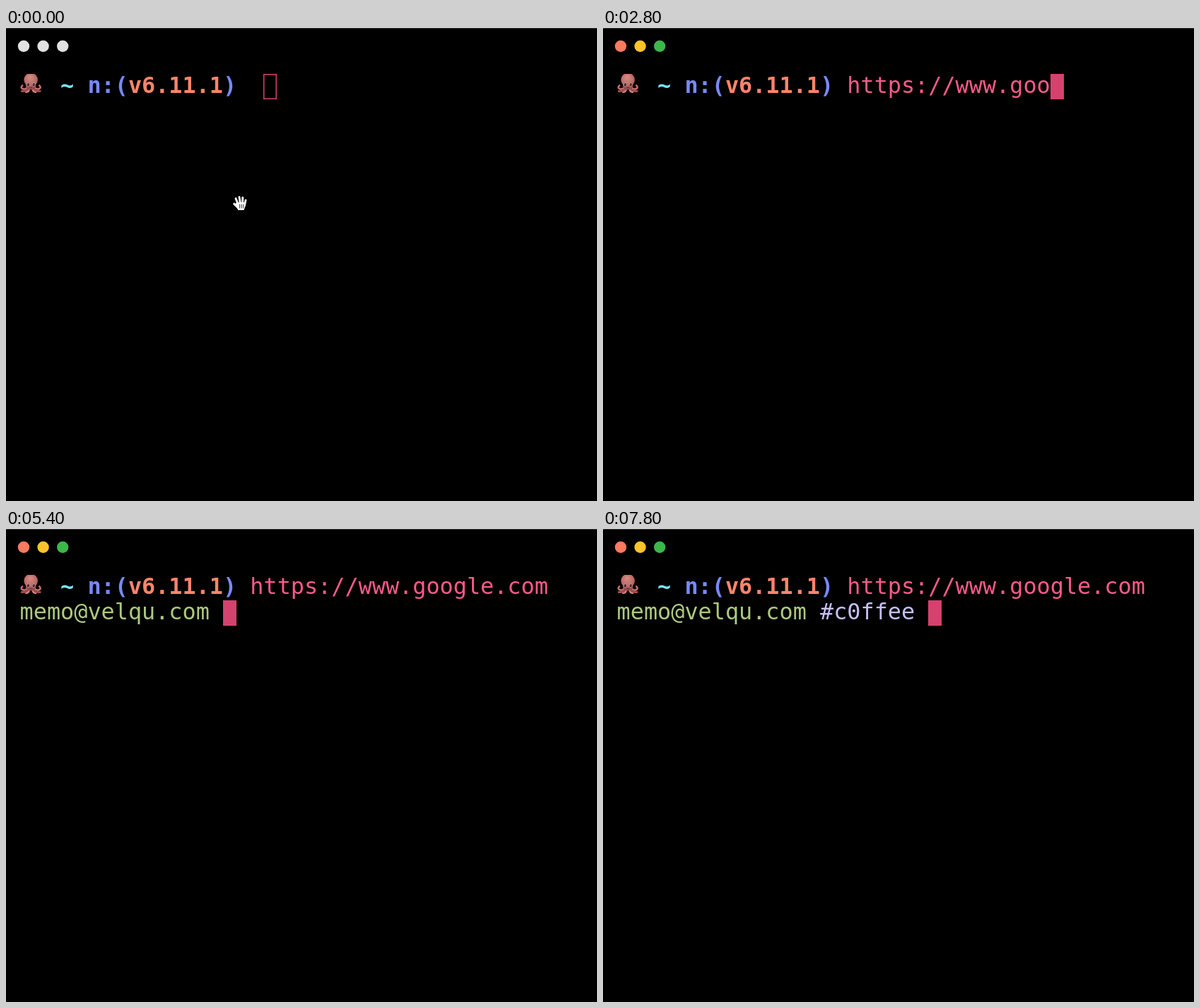
An HTML page with a canvas for the animation above (8000 ms loop, 836 by 670 pixels).

```html
<!DOCTYPE html>
<html lang="en">
<head>
<meta charset="utf-8">
<title>Terminal</title>
<style>
html, body { margin: 0; width: 100%; height: 100%; overflow: hidden; background: #000; }
canvas { display: block; }
</style>
</head>
<body>
<canvas id="stage" width="836" height="670"></canvas>
<script>
const ctx = document.getElementById('stage').getContext('2d');
const LOOP = 8000, STEP = 200, FOCUS = 600, HIDE_HAND = 1000;
const LEFT = 19.6, TOP = 65, COL = 19.16, ROW = 36;
const FONT = '31.83px "DejaVu Sans Mono", monospace';
const URL_TEXT = 'https://www.google.com ';
const REST = 'memo@velqu.com #c0ffee ';
const PINK = '#d5426e';

// Typing pace: time, characters typed
const PACE = [[800, 0], [1600, 6], [2800, 15], [3600, 23], [4600, 31],
  [5400, 38], [6000, 38], [6400, 40], [7400, 46]];

function typedAt(t) {
  if (t <= PACE[0][0]) return 0;
  for (let i = 1; i < PACE.length; i++) {
    const [t0, n0] = PACE[i - 1], [t1, n1] = PACE[i];
    if (t <= t1) return Math.floor(n0 + (n1 - n0) * (t - t0) / (t1 - t0) + 1e-6);
  }
  return URL_TEXT.length + REST.length;
}

const cellX = col => LEFT + col * COL;

function write(text, col, row, color, bold) {
  ctx.font = (bold ? 'bold ' : '') + FONT;
  ctx.fillStyle = color;
  [...text].forEach((ch, i) => ctx.fillText(ch, cellX(col + i), 92 + row * ROW));
}

function ellipse(x, y, rx, ry, color) {
  ctx.fillStyle = color;
  ctx.beginPath();
  ctx.ellipse(x, y, rx, ry, 0, 0, Math.PI * 2);
  ctx.fill();
}

function stroke(path, color, width) {
  ctx.strokeStyle = color;
  ctx.lineWidth = width;
  ctx.lineCap = ctx.lineJoin = 'round';
  ctx.stroke(new Path2D(path));
}

function windowBar(focused) {
  ctx.fillStyle = '#303030';
  ctx.fillRect(0, 0, 836, 1);
  ctx.fillStyle = '#2b447c';
  ctx.fillRect(0, 0, 2, 1);
  const colors = focused ? ['#fb7a60', '#fec32d', '#3cb84a'] : Array(3).fill('#e1e1e1');
  colors.forEach((color, i) => ellipse(25 + i * 27.6, 25.7, 8.2, 8.2, color));
}

function octopus() {
  ctx.save();
  ctx.beginPath();
  ctx.rect(18, TOP, 36, ROW);
  ctx.clip();
  for (const side of [-1, 1]) {
    ctx.save();
    ctx.translate(35.2, 0);
    ctx.scale(side, 1);
    stroke('M4 83 Q8 88 12 86 Q15 84 12 81.5', '#c66e6a', 2.6);
    stroke('M3 85 Q6 90 13 89.5', '#a14d50', 2.8);
    stroke('M2 86 Q3 91 7 91', '#d78480', 2.2);
    ctx.restore();
  }
  const skin = ctx.createRadialGradient(34, 69, 1, 35, 75, 14);
  skin.addColorStop(0, '#d38a82');
  skin.addColorStop(.55, '#bd6c67');
  skin.addColorStop(1, '#7c383d');
  ellipse(35.2, 73.5, 9.8, 9.8, skin);
  ellipse(35.2, 82, 7.2, 5.5, skin);
  for (const x of [31.3, 39.1]) {
    ellipse(x, 79.8, 2.3, 2.6, '#d79a91');
    ellipse(x, 80, 1.6, 1.9, '#1a1011');
    ellipse(x - .4, 79.2, .5, .5, '#fff');
  }
  stroke('M33.5 84 Q35.2 85.3 37 84', '#592329', 1);
  ctx.restore();
}

function hand() {
  stroke('M325 241.5L328.5 250M330 239.5L331.5 249M334.8 240.2L334.6 249M339 244L337.5 251', '#fff', 2.9);
  stroke('M322.7 249.2L328 254', '#fff', 3);
  ctx.fillStyle = '#fff';
  ctx.fill(new Path2D('M326 247L339 247Q339 253 336.5 258L328.5 258Q327 255 323 251Z'));
  stroke('M330.6 250V255M333.2 250V255M335.8 250V255', '#222', .9);
}

function cursor(col, row, focused) {
  const x = Math.round(cellX(col)), y = TOP + row * ROW;
  ctx.fillStyle = ctx.strokeStyle = PINK;
  ctx.lineWidth = 1.5;
  ctx.lineJoin = 'miter';
  if (focused) ctx.fillRect(x, y, 19, ROW);
  else ctx.strokeRect(x + .75, y + .75, 17.5, ROW - 1.5);
}

function draw(t) {
  const focused = t >= FOCUS;
  const typed = typedAt(t);
  const first = URL_TEXT.slice(0, typed);
  const second = REST.slice(0, Math.max(0, typed - URL_TEXT.length));
  const [mail, hex = ''] = second.split(' ');
  const linked = /^https:\/\/\w/.test(first);

  ctx.fillStyle = '#000';
  ctx.fillRect(0, 0, 836, 670);
  windowBar(focused);
  octopus();
  write('~', 3, 0, '#78e4fb', true);
  write('n:(', 5, 0, '#7889fb', true);
  write('v6.11.1', 8, 0, '#fb856b', true);
  write(')', 15, 0, '#7889fb', true);

  write(first, 17, 0, linked ? '#fb5a8c' : '#fff');
  write(mail, 0, 1, /@\w+\.\w/.test(mail) ? '#adc97e' : '#fff');
  write(hex, 15, 1, /^#[0-9a-f]{6}$/.test(hex) ? '#c5c0f5' : '#fff');

  // The wide prompt glyph pushes the cursor one cell on until the link is recognised
  if (second) cursor(second.length, 1, true);
  else cursor(first.length + (linked ? 17 : 18), 0, focused);
  if (t < HIDE_HAND) hand();
}

const start = performance.now();
function tick() {
  const t = (performance.now() - start) % LOOP;
  draw(Math.floor(t / STEP) * STEP);
  requestAnimationFrame(tick);
}
tick();
</script>
</body>
</html>
```
